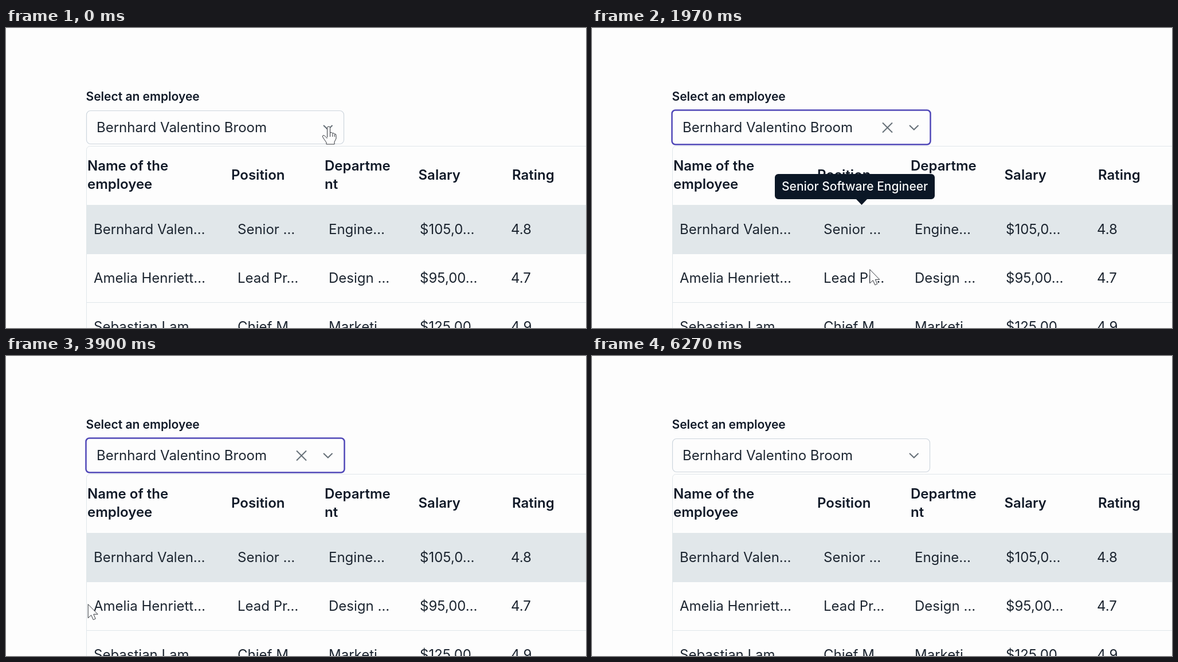
Recreate the animation shown at these times as an HTML page with a canvas. Size 1012 by 524 pixels, loop 6300 ms.

```html
<!DOCTYPE html>
<html lang="en">
<head>
<meta charset="utf-8">
<title>Employee picker</title>
<style>
  html, body { margin: 0; width: 100%; height: 100%; overflow: hidden; background: #fdfdfd; }
  canvas { display: block; }
</style>
</head>
<body>
<canvas id="stage" width="1012" height="524"></canvas>
<script>
const ctx = document.getElementById('stage').getContext('2d');
const LOOP = 6300;
const PAPER = '#fdfdfd', INK = '#1c2530', HEAD = '#111a28', ICON = '#667078';
const LINE = '#e0e6ea', SELECTED = '#e1e7ea', HOVER = '#f0f3f5', TIP = '#0b1726';
const EMPLOYEE = 'Bernhard Valentino Broom';

const columns = [153, 404, 563, 722, 881];
const rows = [
  ['Bernhard Valen…', 'Senior …', 'Engine…', '$105,0…', '4.8'],
  ['Amelia Henriett…', 'Lead Pr…', 'Design …', '$95,00…', '4.7'],
  ['Sebastian Lam…', 'Chief M…', 'Marketi…', '$125,00…', '4.9']
];
const headers = [
  ['Name of the', 142, 249], ['employee', 142, 281], ['Position', 393, 265],
  ['Departme', 556, 249], ['nt', 556, 281], ['Salary', 719.5, 265], ['Rating', 883, 265]
];

// text, left, top, width
const senior = ['Senior Software Engineer', 319, 255, 279];
const lead = ['Lead Product Designer', 332, 339, 253];
const design = ['Design & UX Team', 513, 339, 210];

// tip, shown from, shown until
const tips = [
  [senior, 1120, 2040], [lead, 2060, 2360], [design, 2360, 2900], [lead, 2900, 3500],
  [lead, 4130, 4310], [design, 4310, 4720], [lead, 4720, 5070]
];

// time, x, y of the pointer tip
const path = [
  [0, 563, 172], [150, 563, 172], [500, 545, 300], [900, 480, 362], [1370, 458, 355],
  [1650, 462, 366], [1930, 480, 421], [2200, 530, 424], [2500, 612, 406], [2720, 590, 425],
  [3070, 440, 430], [3230, 440, 430], [3370, 376, 425], [3840, 119, 430], [4130, 400, 462],
  [4400, 575, 478], [4530, 560, 470], [4760, 450, 425], [5000, 271, 381], [5100, 20, 312],
  [5140, -90, 280]
];

const within = (t, from, to) => t >= from && t < to;
const clamp = v => Math.max(0, Math.min(1, v));

function rate(i, k) {
  return (path[i + 1][k] - path[i][k]) / (path[i + 1][0] - path[i][0]);
}

function tangent(i, k) {
  if (i === 0 || i === path.length - 1) return 0;
  const a = rate(i - 1, k), b = rate(i, k);
  return a * b > 0 ? 2 * a * b / (a + b) : 0;
}

// Monotone cubic between the path points
function along(t, k) {
  const last = path.length - 1;
  if (t >= path[last][0]) return path[last][k];
  let i = 0;
  while (t >= path[i + 1][0]) i++;
  const span = path[i + 1][0] - path[i][0];
  const u = (t - path[i][0]) / span, v = 1 - u;
  return path[i][k] * (1 + 2 * u) * v * v + path[i + 1][k] * u * u * (3 - 2 * u) +
    span * (tangent(i, k) * u * v * v - tangent(i + 1, k) * u * u * v);
}

function text(s, x, y, size, weight, color) {
  ctx.font = `${weight} ${size}px Inter, sans-serif`;
  ctx.fillStyle = color;
  ctx.fillText(s, x, y);
}

function fill(x, y, w, h, color) {
  ctx.fillStyle = color;
  ctx.fillRect(x, y, w, h);
}

function stroke(color, width, ...points) {
  ctx.beginPath();
  points.forEach(([x, y]) => ctx.lineTo(x, y));
  ctx.strokeStyle = color;
  ctx.lineWidth = width;
  ctx.stroke();
}

function drawField(t) {
  const focused = within(t, 70, 6210);
  text('Select an employee', 139.5, 127, 21, 600, HEAD);
  ctx.beginPath();
  if (focused) ctx.roundRect(139.5, 143.5, 451, 60, 6);
  else ctx.roundRect(140.5, 144.5, 449, 58, 7);
  ctx.strokeStyle = focused ? '#5048b8' : '#cdd5dd';
  ctx.lineWidth = focused ? 2.5 : 1.2;
  ctx.stroke();
  text(EMPLOYEE, 158, 182, 24, 400, INK);
  stroke(ICON, 2, [554, 170], [561.8, 177.5], [569.5, 170]);
  if (!focused) return;
  stroke(ICON, 2, [507, 165.5], [524, 182.5]);
  stroke(ICON, 2, [524, 165.5], [507, 182.5]);
  if (t % 1060 < 530) fill(456, 159, 1.4, 29, INK);
}

function drawTable(t) {
  fill(141, 309, 871, 86, SELECTED);
  fill(141, 479, 871, 1, LINE);
  if (within(t, 2010, 3870) || within(t, 3950, 5040)) fill(141, 395, 871, 85, HOVER);
  ctx.beginPath();
  ctx.moveTo(140.5, 524);
  ctx.lineTo(140.5, 213);
  ctx.arcTo(140.5, 206.5, 147, 206.5, 6);
  ctx.lineTo(1012, 206.5);
  ctx.strokeStyle = LINE;
  ctx.lineWidth = 1;
  ctx.stroke();
  headers.forEach(([s, x, y]) => text(s, x, y, 24, 600, HEAD));
  rows.forEach((row, r) => row.forEach((s, c) =>
    text(s, columns[c], 360 + 85 * r, 24, 400, INK)));
}

function drawTip([[s, x, y, w], from, to], t) {
  if (!within(t, from, to)) return;
  const tip = x + w / 2 + 12;
  ctx.globalAlpha = Math.min(clamp((t - from) / 60), clamp((to - t) / 40));
  ctx.fillStyle = TIP;
  ctx.beginPath();
  ctx.roundRect(x, y, w, 44, 6);
  ctx.moveTo(tip - 10, y + 43.5);
  ctx.lineTo(tip + 10, y + 43.5);
  ctx.lineTo(tip, y + 54);
  ctx.fill();
  text(s, x + 12, y + 29, 21, 500, '#f8fafb');
  ctx.globalAlpha = 1;
}

const arrow = new Path2D('M0 0V24L5.5 19L9 27L13 25.3L9.6 17.5H17Z');
const hand = new Path2D(
  'M-2.5 19V2.5a2.5 2.5 0 0 1 5 0V11q2.5-2 4.5 1q2.5-1.5 3.5 1.2q2.5-.7 2.5 2.3' +
  'V21L10 27V31H-4V28L-9.5 20q-2.5-4 .5-4.5q2 0 6.5 5.5M2.5 11V18M7 12.5V18M10.5 13.5V18');

function drawPointer(t) {
  const x = along(t, 1), y = along(t, 2);
  if (x < -30) return;
  ctx.save();
  ctx.translate(x, y);
  const shape = y < 204 ? hand : arrow;
  ctx.fillStyle = '#fdfdfd';
  ctx.fill(shape);
  ctx.strokeStyle = '#33373d';
  ctx.lineWidth = 1;
  ctx.stroke(shape);
  ctx.restore();
}

function draw(now) {
  const t = now % LOOP;
  fill(0, 0, 1012, 524, PAPER);
  drawTable(t);
  drawField(t);
  tips.forEach(tip => drawTip(tip, t));
  drawPointer(t);
}

const start = performance.now();
function frame() {
  draw(performance.now() - start);
  requestAnimationFrame(frame);
}
frame();
</script>
</body>
</html>
```
